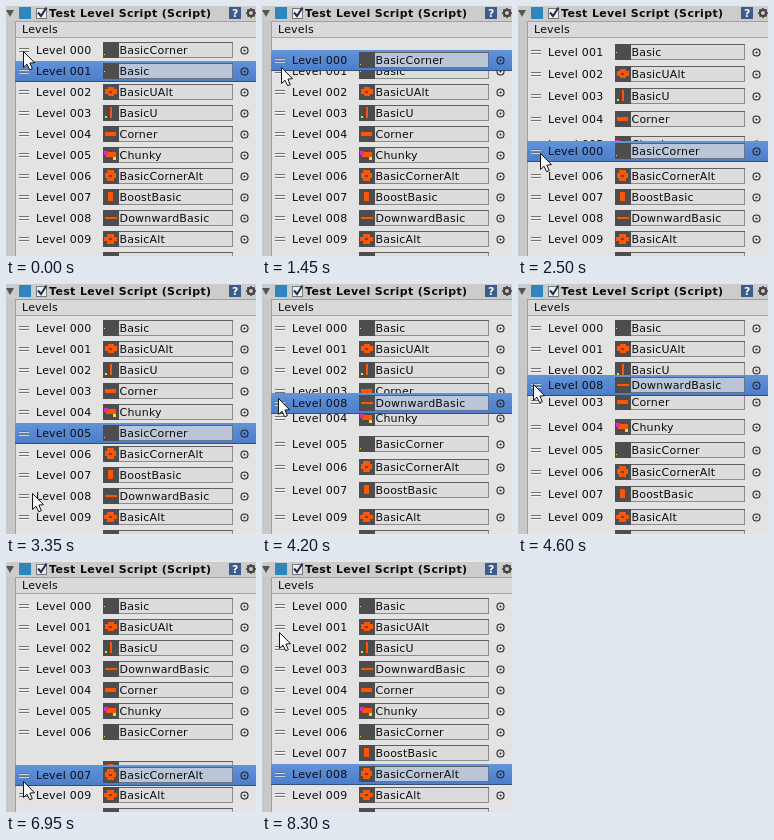
Recreate the animation shown at these times as an HTML page with a canvas. Size 250x250 px, loop 8350 ms.

```html
<!DOCTYPE html>
<html lang="en">
<head>
<meta charset="utf-8">
<title>Reorderable level list</title>
<style>
  html, body { margin: 0; width: 100%; height: 100%; overflow: hidden; background: #e3e3e3; }
  canvas { display: block; width: 100vw; height: 100vh; }
</style>
</head>
<body>
<canvas id="stage" width="250" height="250"></canvas>
<script>
const ctx = document.getElementById('stage').getContext('2d');
const LOOP = 8350, STEP = 50, PITCH = 21;
const SLIDE = 410;   // time constant of a row sliding aside
const OVERLAP = 6;   // distance before a slot at which its row gives way
const SANS = '"DejaVu Sans", Verdana, sans-serif';
const ORANGE = '#ff5400', YELLOW = '#f2dc1e', DARK = '#4d4d4d';

// A thumbnail is a few orange blocks [w, h] around its middle, plus dots
const level = (name, blocks = [], dots = []) => ({ name, blocks, dots });
const dot = (color, x, y, size) => ({ color, x, y, size });

const levels = [
  level('BasicCorner', [], [dot(YELLOW, 1, 12, 1)]),
  level('Basic', [], [dot('#d8d8d8', 1, 8, 1)]),
  level('BasicUAlt', [[12, 5], [6, 9]]),
  level('BasicU', [[2, 11]], [dot(YELLOW, 2, 11, 2)]),
  level('Corner', [[11, 4]]),
  level('Chunky', [[10, 5]], [dot('#f020d0', 1, 4, 4), dot(YELLOW, 10, 10, 3)]),
  level('BasicCornerAlt', [[11, 5], [7, 11]]),
  level('BoostBasic', [[5, 9]]),
  level('DownwardBasic', [[12, 2]]),
  level('BasicAlt', [[13, 4], [7, 10]]),
  level('')
];

const smooth = u => u * u * (3 - 2 * u);
const easeOut = u => 1 - (1 - u) ** 3;

// Pointer moves; a bow swings the path out to the right
const start = { x: 17, y: 45 };
const moves = [
  { from: 350, to: 400, x: 19, y: 46 },
  { from: 1200, to: 2230, x: 22, y: 147 },
  { from: 2750, to: 3430, x: 25, y: 211, bow: 8 },
  { from: 3600, to: 4830, x: 15, y: 99, ease: easeOut },
  { from: 5800, to: 6300, x: 18, y: 194, bow: 5 },
  { from: 6450, to: 7090, x: 17, y: 222 },
  { from: 7500, to: 8050, x: 17, y: 74, bow: 5 },
  { from: 8150, to: 8300, x: 17, y: 70 }
];

const drags = [
  { press: 1050, drop: 2600, from: 0, to: 5 },
  { press: 3600, drop: 5200, from: 8, to: 3 },
  { press: 6450, drop: 7350, from: 7, to: 8 }
];

const slot = i => 44 + PITCH * i;

function pointer(t) {
  let { x, y } = start;
  for (const m of moves) {
    if (t <= m.from) break;
    const k = (m.ease || smooth)(Math.min(1, (t - m.from) / (m.to - m.from)));
    x += (m.x - x) * k + (m.bow || 0) * Math.sin(Math.PI * k);
    y += (m.y - y) * k;
  }
  return { x, y };
}

// The held row trails the pointer by one step
function heldY(d, t) {
  return slot(d.from) + pointer(Math.max(d.press, t - STEP)).y - pointer(d.press).y;
}

// Work out when each row gives way, and the order after each drop
let order = levels;
for (const d of drags) {
  d.dir = Math.sign(d.to - d.from);
  d.order = order;
  d.cross = {};
  for (let i = d.from + d.dir; i !== d.to + d.dir; i += d.dir) {
    let t = d.press;
    while (t < d.drop && d.dir * (heldY(d, t) - slot(i)) < -OVERLAP) t += 5;
    d.cross[i] = t;
  }
  order = order.slice();
  order.splice(d.to, 0, order.splice(d.from, 1)[0]);
}
const finalOrder = order;

function rect(color, x, y, w, h) {
  ctx.fillStyle = color;
  ctx.fillRect(x, y, w, h);
}

function text(str, x, y, weight = '', color = '#0c0c0c') {
  ctx.font = `${weight} 11px ${SANS}`;
  ctx.letterSpacing = weight ? '0.35px' : '0.2px';
  ctx.fillStyle = color;
  ctx.fillText(str, x, y);
}

function circle(x, y, r, color, line) {
  ctx.beginPath();
  ctx.arc(x, y, r, 0, Math.PI * 2);
  ctx.fillStyle = ctx.strokeStyle = color;
  ctx.lineWidth = line || 1;
  if (line) ctx.stroke();
  else ctx.fill();
}

function shape(points, fill, stroke) {
  ctx.beginPath();
  points.forEach(([x, y]) => ctx.lineTo(x, y));
  ctx.closePath();
  ctx.fillStyle = fill;
  ctx.fill();
  if (stroke) {
    ctx.strokeStyle = stroke;
    ctx.lineWidth = 1;
    ctx.stroke();
  }
}

function drawThumb({ name, blocks, dots }, x, y) {
  rect(DARK, x, y, 16, 16);
  for (const [w, h] of blocks) {
    rect(ORANGE, x + 8 - Math.ceil(w / 2), y + 8 - Math.ceil(h / 2), w, h);
  }
  if (name.endsWith('Alt')) rect(DARK, x + 6, y + 7, 3, 2);
  for (const d of dots) rect(d.color, x + d.x, y + d.y, d.size, d.size);
}

function drawRow(item, index, center, selected) {
  const c = Math.round(center), top = c - 10;
  if (selected) {
    const g = ctx.createLinearGradient(0, top, 0, top + PITCH);
    g.addColorStop(0, '#6294da');
    g.addColorStop(1, '#4a7cc9');
    rect(g, 9, top, 241, PITCH);
    rect('#34507f', 9, top + PITCH - 1, 241, 1);
  }
  for (const y of [c - 2, c + 1]) {
    rect('#707070', 13, y, 10, 1);
    rect(selected ? '#c3d2ea' : '#f4f4f4', 13, y + 1, 10, 1);
  }
  text('Level ' + String(index).padStart(3, '0'), 30, c + 4);

  rect(selected ? '#63758f' : '#8c8c8c', 97, c - 8, 130, 16);
  rect(selected ? '#bac6d8' : '#dcdcdc', 113, c - 7, 113, 14);
  rect('#606060', 113, c - 8, 114, 1);
  drawThumb(item, 97, c - 8);
  text(item.name, 113.5, c + 4);

  circle(238.5, c + 0.5, 3.5, '#222', 1.1);
  circle(238.5, c + 0.5, 1, '#222');
}

function drawPanel() {
  rect('#e3e3e3', 0, 0, 250, 250);
  rect('#cccccc', 0, 0, 250, 15);
  rect('#c8c8c8', 0, 15, 9, 235);
  rect('#d9d9d9', 9, 15, 241, 17);
  rect('#a0a0a0', 9, 15, 241, 1);
  rect('#a6a6a6', 9, 31, 241, 1);
  rect('#a0a0a0', 9, 15, 1, 235);

  shape([[0, 4], [8, 4], [4, 11]], '#555');
  rect('#2f86bd', 13, 1, 12, 12);
  rect('#777', 30, 2, 11, 11);
  rect('#eeeeee', 31, 3, 9, 9);
  ctx.beginPath();
  ctx.moveTo(32, 6.5);
  ctx.lineTo(35, 10);
  ctx.lineTo(40.5, 1.5);
  ctx.strokeStyle = '#1c2f55';
  ctx.lineWidth = 2;
  ctx.stroke();
  text('Test Level Script (Script)', 43, 11, 'bold');
  text('Levels', 16, 27);

  // Help book and settings gear
  rect('#3d5c8c', 223, 1, 12, 12);
  text('?', 226, 11, 'bold', '#f2f5fa');
  for (let i = 0; i < 8; i++) {
    const a = i * Math.PI / 4;
    circle(245 + 4 * Math.cos(a), 7 + 4 * Math.sin(a), 1.1, '#444');
  }
  circle(245, 7, 3, '#444', 2);
}

function drawList(t) {
  const held = drags.find(d => t >= d.press && t < d.drop);
  const next = drags.find(d => t < d.drop);
  const done = drags.filter(d => t >= d.drop).pop();
  const rows = next ? next.order : finalOrder;
  const selected = held ? held.from : done ? done.to : 1;

  rows.forEach((item, i) => {
    if (held && i === held.from) return;
    let y = slot(i);
    if (held && t > held.cross[i]) {
      y -= held.dir * PITCH * (1 - Math.exp((held.cross[i] - t) / SLIDE));
    }
    drawRow(item, i, y, i === selected);
  });
  if (held) drawRow(rows[held.from], held.from, heldY(held, t), true);
}

function drawPointer(t) {
  const { x, y } = pointer(t);
  ctx.save();
  ctx.translate(Math.round(x) + 0.5, Math.round(y) + 0.5);
  shape([[0, 0], [0, 16], [3.5, 12.7], [6.2, 18.2], [8.8, 17.2], [6.4, 11.6], [11, 11.2]],
    '#fff', '#111');
  ctx.restore();
}

function frame(now) {
  const t = Math.floor((now % LOOP) / STEP) * STEP;
  drawPanel();
  drawList(t);
  drawPointer(t);
  requestAnimationFrame(frame);
}
requestAnimationFrame(frame);
</script>
</body>
</html>
```
